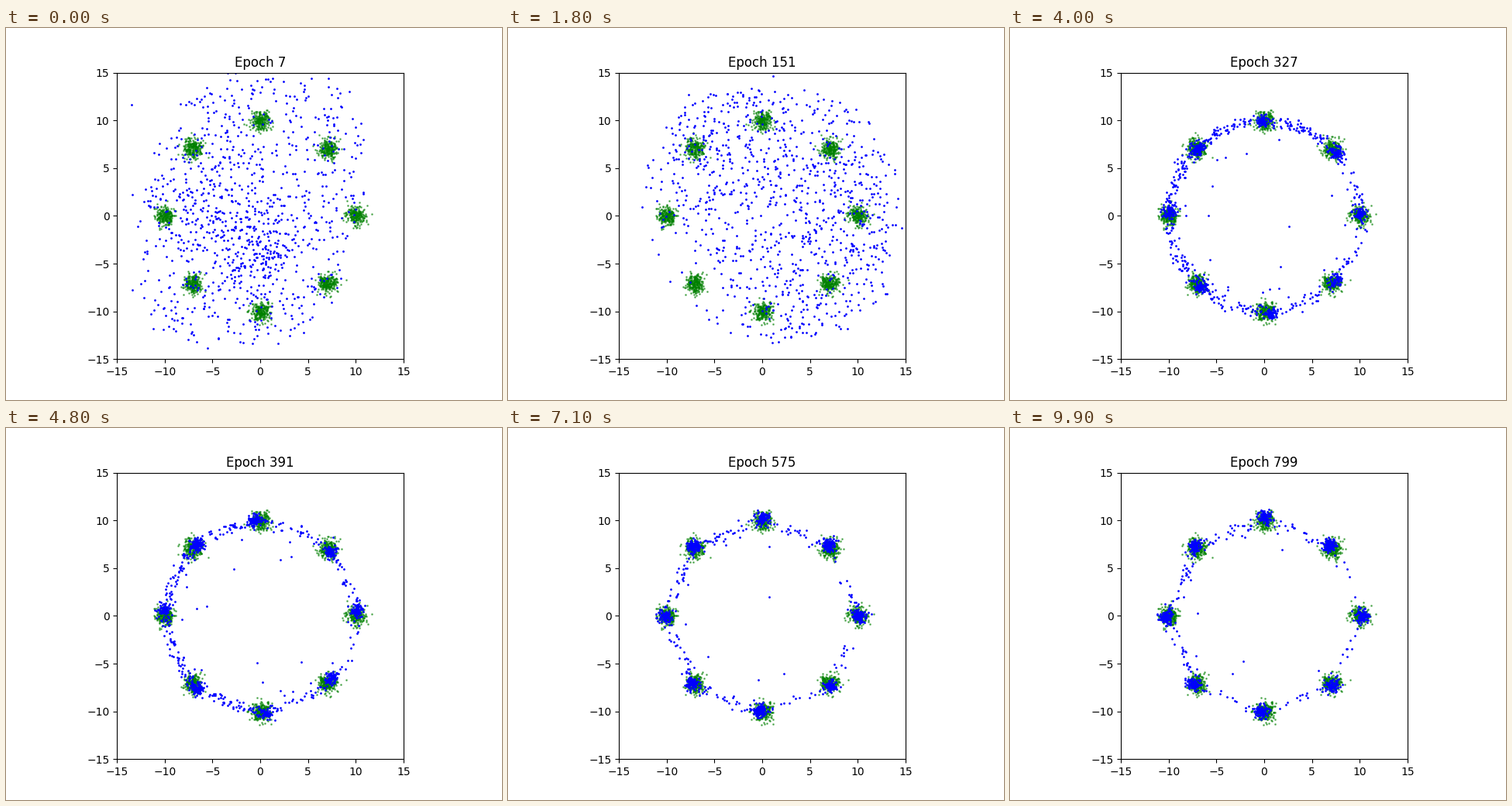
A matplotlib script for the animation above (10000 ms loop, 640x480 px).

```python
import numpy as np
import matplotlib.pyplot as plt
from matplotlib.animation import FuncAnimation

FRAMES = 100
COUNT = 1000
STEP = np.pi / 4
ANGLES = STEP * np.arange(8)
MODES = 10 * np.exp(1j * ANGLES)
PHASES = np.random.default_rng(8).uniform(0, 2 * np.pi, (2, 8))


def smooth(k, start, end):
    u = np.clip((k - start) / (end - start), 0, 1)
    return u * u * (3 - 2 * u)


def blur(rng, n, sx=1.0, sy=1.0):
    return rng.normal(0, sx, n) + 1j * rng.normal(0, sy, n)


def patch(rng, n, radius):
    """Evenly filled disk with slightly squared sides and a soft rim."""
    a = 2 * np.pi * rng.random(n)
    square = (np.cos(a) ** 4 + np.sin(a) ** 4) ** -.15
    r = radius * square * np.sqrt(rng.random(n))
    return r * np.exp(1j * a) + blur(rng, n, .6, .6)


def cloud(rng, k):
    """Sheared early scatter with a denser band left of the middle."""
    p = patch(rng, COUNT, 13.5)
    wide = .82 * p.real + .2 * p.imag - 1 + 1j * (1.08 * p.imag + .8)
    band = -3.8 + .2j + blur(rng, COUNT, 3.3, 4)
    core = .3 - 3.5j + blur(rng, COUNT, 1.3, 2.5)
    u = rng.random(COUNT)
    return np.where(u < .7, wide, np.where(u < .9, band, core)) + 2 * np.sin(k * .4)


def disk(rng):
    """Even patch, thinned out at the lower left."""
    p = patch(rng, 4 * COUNT, 13) + .7 + .2j
    chance = np.clip(1 + (p.real + .6 * p.imag + 2) / 12, .03, 1)
    return p[rng.random(p.size) < chance][:COUNT]


def ring(rng, k):
    """Blobs swaying about the modes, joined by thin sagging links."""
    late = smooth(k, 38, 58)
    n_link = int(COUNT * (.55 - .27 * late - .05 * smooth(k, 58, 95)))

    b = rng.integers(0, 8, COUNT - n_link)
    slide = (.8 - .3 * late) * np.sin(k * .9 + PHASES[0])
    swell = .1 + .2 * np.sin(k * .7 + PHASES[1])
    centres = MODES + (swell + 1j * slide) * np.exp(1j * ANGLES)
    blobs = centres[b] + blur(rng, b.size, .34, .34)

    # The left half of the ring keeps more links than the right.
    share = 1 + .4 * np.cos(ANGLES + STEP / 2 - 2.8)
    a = rng.choice(8, n_link, p=share / share.sum())
    u = rng.beta(.8, .8, n_link)
    r = 10.1 - (.1 + .6 * late) * np.sin(np.pi * u) + rng.normal(0, .33, n_link)
    r -= (rng.random(n_link) < .07) * rng.exponential(1.5, n_link)
    return np.concatenate([blobs, r * np.exp(1j * STEP * (a + u))])


def by_angle(p):
    return p[np.argsort(np.angle(p))]


def samples(k):
    rng = np.random.default_rng(500 + k)
    if k < 19:
        early, wide = cloud(rng, k), disk(rng)
        return np.where(rng.random(COUNT) < smooth(k, 0, 16), wide, early)
    start, end = by_angle(disk(rng)), by_angle(ring(rng, k))
    return start + (end - start) * smooth(k, 18, 37)


def dots(ax, p, **style):
    return ax.scatter(p.real, p.imag, s=1, **style)


fig, ax = plt.subplots(figsize=(6.4, 4.8), dpi=100)
ax.set_aspect("equal")
ax.set(xlim=(-15, 15), ylim=(-15, 15),
       xticks=range(-15, 16, 5), yticks=range(-15, 16, 5))
title = ax.set_title("Epoch 7", pad=5.5)

real = np.repeat(MODES, 250) + blur(np.random.default_rng(3), 2000, .5, .5)
dots(ax, real, c="green", alpha=.5)
fake = dots(ax, samples(0), c="blue")


def update(k):
    title.set_text(f"Epoch {7 + 8 * k}")
    p = samples(k)
    fake.set_offsets(np.column_stack([p.real, p.imag]))
    return fake, title


anim = FuncAnimation(fig, update, frames=FRAMES, interval=100,
                     repeat=True, repeat_delay=0)
plt.show()
```
